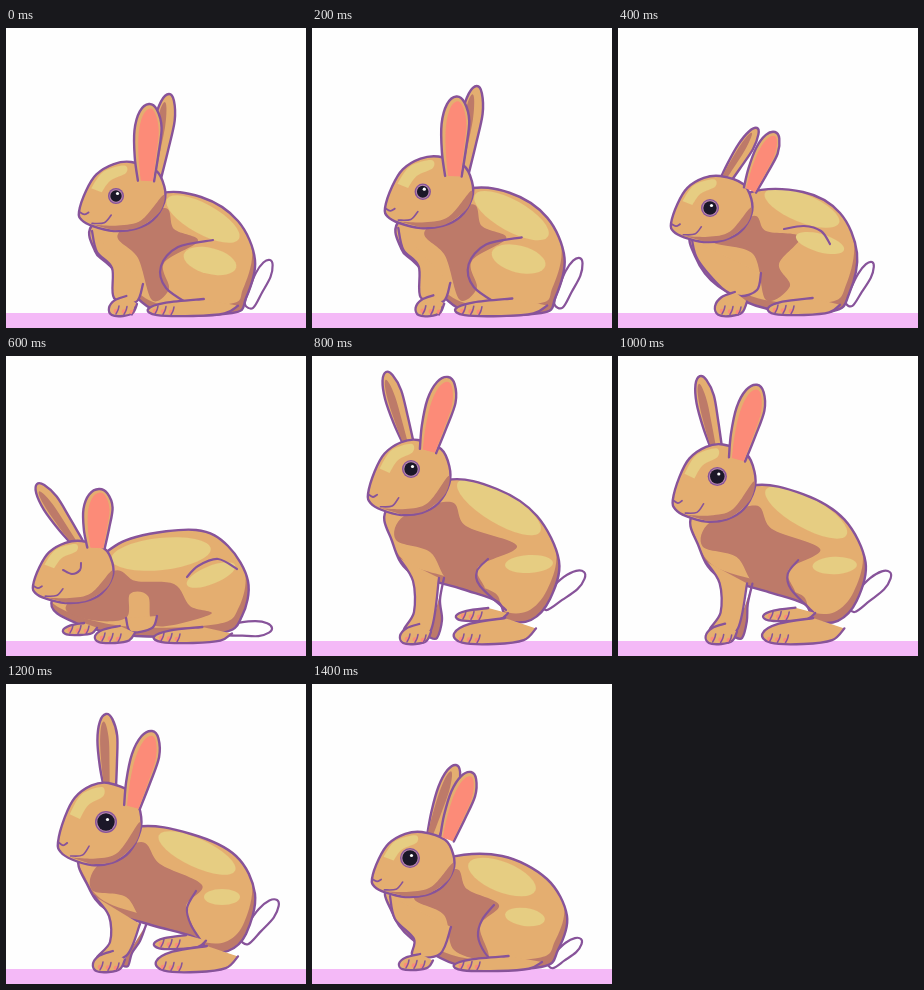
Recreate the animation shown at these times as an HTML page with a canvas. Size 300 px wide and 300 px high, loop 1.6 s.

```html
<!DOCTYPE html>
<html lang="en">
<head>
<meta charset="utf-8">
<title>Rabbit</title>
<style>
html, body { margin: 0; width: 100%; height: 100%; overflow: hidden; background: #fefefe; }
canvas { display: block; width: 300px; height: 300px; }
</style>
</head>
<body>
<canvas id="stage" width="300" height="300"></canvas>
<script>
const ctx = document.getElementById('stage').getContext('2d');
const LINE = '#87539a', BASE = '#e4ae70', SHADE = '#bd7a69',
      LIGHT = '#e6cd82', PINK = '#fc8b78', DARK = '#1b1728', WHITE = '#fefefe';

// Ears and tail: base x, y, tip x, y, width. Head and paws: x, y, width, height.
// Glows: centre x, y, radii, degrees. The rest are points on a curve.
const sitting = {
  head: [73, 134, 87, 69], eye: [110, 168, 8],
  near: [140, 153, 143, 76, 27], far: [149, 150, 163, 66, 20], tail: [243, 278, 264, 232, 15],
  body: [150, 166, 195, 169, 232, 193, 249, 232, 240, 270, 226, 285, 150, 283, 104, 238, 89, 223, 88, 195],
  shade: [112, 206, 158, 180, 168, 201, 192, 213, 158, 235, 163, 261, 146, 272, 132, 230],
  glows: [[197, 191, 41, 15, 29], [204, 233, 27, 13, 14]],
  haunch: [207, 212, 172, 219, 155, 238, 160, 260, 186, 278],
  leg: [86, 203, 91, 224, 106, 240, 108, 270, 130, 274, 137, 256],
  paws: [[103, 268, 28, 20], [142, 271, 90, 17]]
};

const lowered = {
  head: [53, 148, 82, 66], eye: [92, 180, 9],
  near: [132, 162, 157, 104, 22], far: [104, 158, 139, 100, 15], tail: [231, 276, 254, 234, 13],
  body: [130, 165, 185, 164, 222, 185, 239, 225, 231, 266, 215, 283, 150, 281, 100, 258, 77, 228, 76, 200],
  shade: [95, 213, 135, 188, 148, 203, 182, 209, 161, 236, 172, 258, 148, 272, 135, 226],
  glows: [[184, 180, 40, 14, 22], [202, 215, 25, 9, 16]],
  haunch: [212, 216, 203, 203, 186, 198, 166, 201],
  leg: [74, 212, 80, 232, 104, 260, 122, 268, 139, 262, 143, 245],
  paws: [[97, 264, 32, 24], [150, 270, 72, 17]]
};

const crouched = {
  head: [27, 185, 81, 62], eye: [66, 214, 0],
  near: [90, 192, 93, 133, 29], far: [72, 187, 31, 128, 18], tail: [220, 274, 266, 272, 15],
  body: [95, 200, 130, 181, 190, 174, 222, 190, 242, 225, 236, 260, 215, 277, 130, 280, 70, 267, 46, 244],
  shade: [60, 250, 107, 215, 130, 225, 168, 228, 184, 250, 205, 258, 150, 270, 142, 240, 124, 238, 120, 262, 85, 264],
  glows: [[155, 198, 50, 16, -6], [205, 219, 26, 9, -22]],
  haunch: [181, 221, 192, 210, 212, 203, 231, 213],
  leg: [120, 262, 125, 276, 146, 272, 151, 260],
  paws: [[57, 267, 34, 12], [89, 270, 40, 17], [148, 271, 78, 16]]
};

const standing = {
  head: [56, 84, 83, 75], eye: [99, 113, 9],
  near: [116, 95, 136, 21, 28], far: [96, 86, 74, 16, 18], tail: [231, 250, 272, 216, 18],
  body: [135, 124, 185, 133, 225, 160, 247, 205, 238, 243, 219, 264, 195, 264, 186, 246, 150, 233, 98, 216, 80, 185, 76, 152],
  shade: [92, 160, 139, 146, 154, 170, 205, 190, 166, 211, 172, 234, 136, 224, 118, 196, 84, 184],
  glows: [[187, 151, 48, 16, 31], [217, 208, 24, 9, -3]],
  haunch: [176, 203, 165, 215, 168, 230, 194, 254],
  backLeg: [132, 222, 128, 244, 130, 264, 125, 282, 117, 281],
  leg: [87, 202, 101, 225, 102, 256, 92, 276, 118, 276, 127, 222],
  paws: [[88, 268, 31, 20], [144, 252, 52, 13], [142, 262, 82, 26]]
};

const settling = {
  head: [52, 99, 84, 82], eye: [100, 138, 11],
  near: [126, 123, 146, 47, 27], far: [104, 104, 100, 30, 20], tail: [238, 257, 271, 216, 17],
  body: [130, 143, 185, 150, 230, 172, 249, 210, 240, 250, 222, 267, 198, 266, 188, 253, 145, 241, 101, 226, 82, 202, 75, 170],
  shade: [92, 181, 135, 158, 154, 180, 196, 201, 180, 222, 187, 252, 141, 241, 120, 213, 86, 206],
  glows: [[191, 169, 42, 14, 25], [216, 213, 18, 8, 0]],
  haunch: [190, 207, 181, 224, 185, 241, 198, 261],
  backLeg: [140, 241, 134, 257, 126, 269, 122, 282, 115, 281],
  leg: [88, 212, 103, 232, 104, 258, 91, 275, 120, 272, 134, 240],
  paws: [[87, 267, 32, 21], [148, 251, 52, 14], [150, 262, 82, 26]]
};

const resting = {
  head: [60, 148, 83, 65], eye: [98, 174, 10],
  near: [135, 155, 159, 88, 24], far: [121, 152, 144, 81, 20], tail: [238, 281, 269, 255, 14],
  body: [135, 174, 190, 172, 235, 195, 255, 232, 246, 266, 229, 283, 150, 282, 100, 255, 80, 228, 77, 200],
  shade: [102, 213, 143, 185, 155, 205, 187, 221, 168, 242, 176, 274, 142, 266, 132, 231],
  glows: [[190, 193, 36, 15, 22], [213, 233, 20, 9, 8]],
  haunch: [182, 221, 170, 236, 166, 252, 173, 269, 186, 282],
  leg: [78, 212, 83, 235, 102, 255, 101, 272, 128, 270, 139, 243],
  paws: [[87, 270, 34, 16], [142, 272, 88, 15]]
};

// Shared shapes, in percent of their box
const HEAD = [60, 0, 40, 3, 20, 18, 8, 42, 0, 72, 3, 84, 16, 93, 40, 100, 65, 97, 85, 84, 98, 58, 98, 35, 88, 12];
const BROW = [14, 38, 28, 14, 52, 5, 54, 16, 36, 27, 26, 44];
const JAW = [16, 91, 45, 92, 72, 84, 97, 48, 93, 72, 68, 95, 40, 99];
const NOSE = [0, 72, 6, 76, 11, 73];
const MOUTH = [15, 89, 29, 88, 37, 77];
const PAW = [62, 0, 20, 22, 0, 60, 10, 95, 50, 100, 85, 85, 100, 40];
// Distance along the ear and to its side
const LEAF = [0, -30, 30, -45, 65, -50, 90, -33, 100, 0, 93, 30, 70, 50, 35, 42, 0, 30];

const pairs = list => list.flatMap((x, i) => i % 2 ? [] : [[x, list[i + 1]]]);
const inBox = (shape, [x, y, w, h]) => pairs(shape).map(([u, v]) => [x + u * w / 100, y + v * h / 100]);

function leaf([x, y, tx, ty, width], thick = 1, shift = 0, end = 1) {
  const dx = tx - x, dy = ty - y, k = width / Math.hypot(dx, dy);
  return pairs(LEAF).map(([u, v]) => {
    const along = u / 100 * end, side = (v / 100 * thick + shift) * k;
    return [x + dx * along - dy * side, y + dy * along + dx * side];
  });
}

function blend(a, b, k) {
  if (typeof a === 'number') return a + (b - a) * k;
  if (Array.isArray(a)) return a.map((v, i) => blend(v, b[i], k));
  return Object.fromEntries(Object.keys(a).map(key => [key, blend(a[key], b[key], k)]));
}

// Smooth curve through all points
function draw(pts, fill, width, closed) {
  const n = pts.length;
  const at = i => closed ? pts[(i + n) % n] : pts[Math.max(0, Math.min(n - 1, i))];
  ctx.beginPath();
  ctx.moveTo(...pts[0]);
  for (let i = 0; i < (closed ? n : n - 1); i++) {
    const [a, b, c, d] = [at(i - 1), at(i), at(i + 1), at(i + 2)];
    ctx.bezierCurveTo(b[0] + (c[0] - a[0]) / 6, b[1] + (c[1] - a[1]) / 6,
                      c[0] - (d[0] - b[0]) / 6, c[1] - (d[1] - b[1]) / 6, c[0], c[1]);
  }
  if (fill) {
    ctx.fillStyle = fill;
    ctx.fill();
  }
  if (width) {
    ctx.lineWidth = width;
    ctx.stroke();
  }
}

function oval(x, y, rx, ry, deg, color) {
  ctx.fillStyle = color;
  ctx.beginPath();
  ctx.ellipse(x, y, rx, ry, deg * Math.PI / 180, 0, 7);
  ctx.fill();
}
const dot = (x, y, r, color) => oval(x, y, r, r, 0, color);

function drawBody({ body, shade, glows, haunch }) {
  const pts = pairs(body);
  ctx.save();
  draw(pts, SHADE, 0, true);
  ctx.clip();
  draw(pts.map(([x, y]) => [x - 3, y - 9]), BASE, 0, true);
  draw(pairs(shade), SHADE, 0, true);
  glows.forEach(g => oval(...g, LIGHT));
  ctx.restore();
  draw(pts, null, 2.4, true);
  draw(pairs(haunch), null, 2.2);
}

function drawPaw(box) {
  const [x, y, , h] = box;
  draw(inBox(PAW, box), BASE, 2.3);
  for (let i = 0; i < 3; i++) {
    const cx = x + 7 + i * 8, cy = y + h - 5 + i * 0.5;
    dot(cx, cy, 2.3, PINK);
    draw([[cx + 3, cy - 5], [cx + 2, cy - 1], [cx, cy + 3]], null, 1.5);
  }
}

function drawEye([x, y, r]) {
  if (!r) return draw([[x - 9, y], [x, y + 4], [x + 8, y], [x + 9, y - 7]], null, 2);
  dot(x, y, r, LINE);
  dot(x, y, r - 1.3, '#b98aae');
  dot(x, y, r - 2.3, DARK);
  dot(x + 1.5, y - 2.5, 1.6, WHITE);
}

function drawRabbit(pose) {
  const { head, near, far } = pose;
  draw(leaf(pose.tail), WHITE, 2.2, true);
  drawBody(pose);
  if (pose.backLeg) draw(pairs(pose.backLeg), SHADE, 2.3);
  draw(pairs(pose.leg), BASE, 2.3);
  pose.paws.forEach(drawPaw);
  draw(leaf(far), BASE, 2.4);
  draw(leaf(far, 0.45, -0.15, 0.9), SHADE);
  draw(inBox(HEAD, head), BASE, 2.4, true);
  draw(inBox(JAW, head), SHADE);
  draw(inBox(BROW, head), LIGHT);
  draw(leaf(near), BASE, 2.4);
  draw(leaf(near, 0.74, 0.03, 0.94), PINK);
  drawEye(pose.eye);
  draw(inBox(NOSE, head), null, 1.8);
  draw(inBox(MOUTH, head), null, 1.6);
}

const poses = [sitting, sitting, lowered, crouched, standing,
               blend(standing, settling, 0.3), settling, resting];

function frame() {
  const step = Math.floor(performance.now() % 1600 / 200);
  ctx.fillStyle = WHITE;
  ctx.fillRect(0, 0, 300, 300);
  ctx.fillStyle = '#f4b9f7';
  ctx.fillRect(0, 285, 300, 15);
  ctx.strokeStyle = LINE;
  ctx.lineCap = ctx.lineJoin = 'round';
  ctx.save();
  if (step === 1) { // a slight stretch upwards from the feet
    ctx.translate(72, 286);
    ctx.scale(1.02, 1.036);
    ctx.translate(-72, -286);
  }
  drawRabbit(poses[step]);
  ctx.restore();
  requestAnimationFrame(frame);
}
frame();
</script>
</body>
</html>
```
